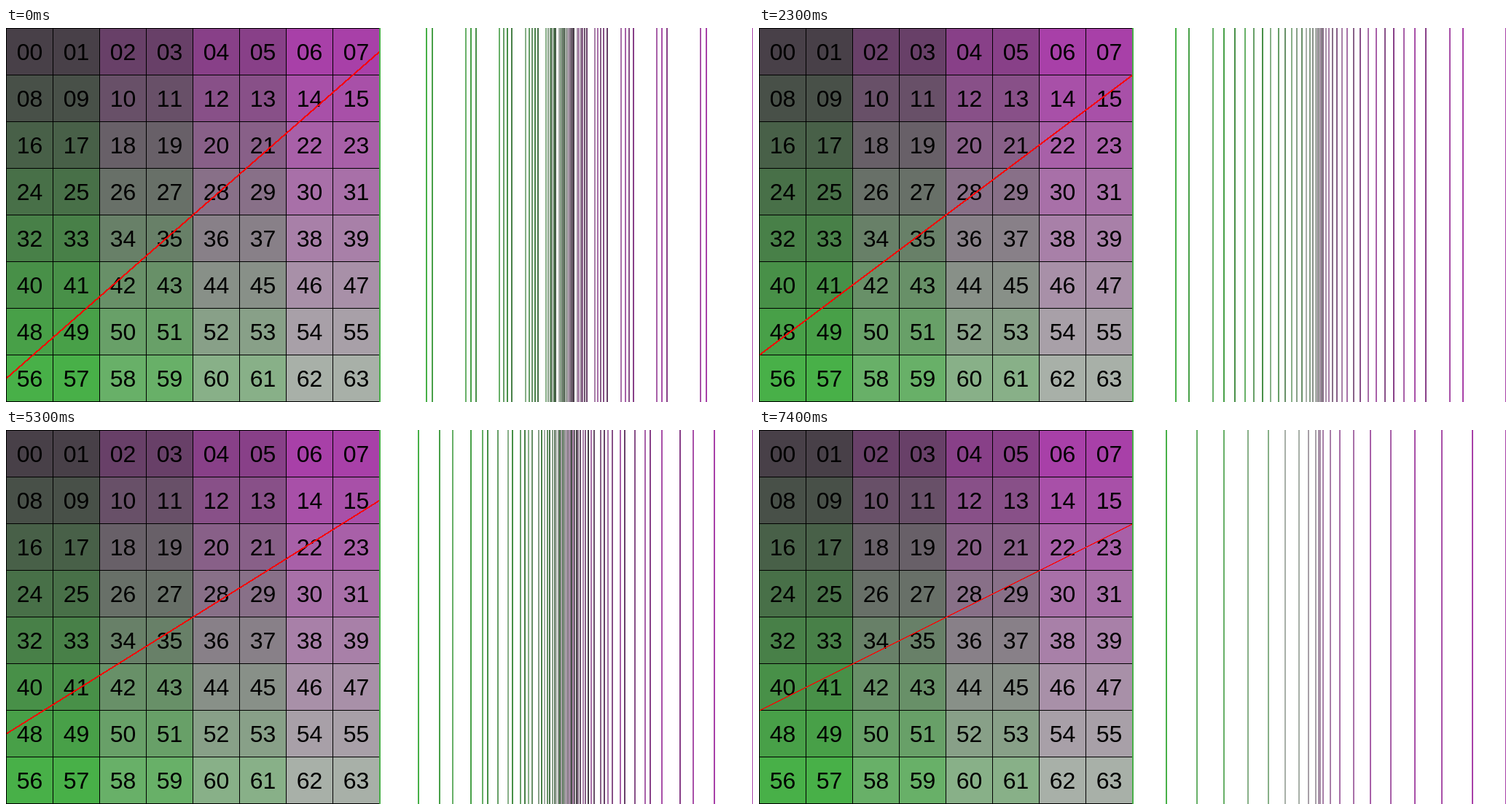
Write an HTML page that moves like this. It is 1025 by 513 pixels and loops after 8000 ms.

```html
<!DOCTYPE html>
<html lang="en">
<head>
<meta charset="utf-8">
<title>Grid projection</title>
<style>
  html, body { margin: 0; width: 100%; height: 100%; overflow: hidden; background: #fff; }
  svg { display: block; width: 1025px; height: 513px; }
  text {
    font: 32px "Liberation Sans", Arial, sans-serif;
    font-kerning: none;
    text-anchor: middle;
  }
</style>
</head>
<body>
<svg viewBox="0 0 1025 513">
  <g id="cells" shape-rendering="crispEdges"></g>
  <g id="labels"></g>
  <path id="ray" fill="#f00" shape-rendering="crispEdges"/>
  <g id="bars" shape-rendering="crispEdges"></g>
</svg>
<script>
const N = 8, CELL = 64, SIZE = N * CELL, MID = SIZE / 2;
const LOOP = 8000;
// start time in ms, rise of the ray per eight columns
const STEPS = [[0, 7], [500, 6], [3500, 5], [6500, 4]];

const $ = id => document.getElementById(id);

function add(parent, tag, attrs) {
  const el = document.createElementNS("http://www.w3.org/2000/svg", tag);
  for (const key in attrs) el.setAttribute(key, attrs[key]);
  return parent.appendChild(el);
}

const cells = Array.from({ length: N * N }, (_, n) => {
  const col = n % N, row = Math.floor(n / N);
  const rb = 72 + 32 * Math.floor(col / 2), g = 64 + 16 * row;
  return { n, col, row, fill: `rgb(${rb},${g},${rb})` };
});

function buildGrid() {
  const box = $("cells");
  add(box, "rect", { width: SIZE + 1, height: SIZE + 1, fill: "#000" });
  for (const { n, col, row, fill } of cells) {
    const x = col * CELL, y = row * CELL;
    add(box, "rect", { x: x + 1, y: y + 1, width: CELL - 1, height: CELL - 1, fill });
    add($("labels"), "text", { x: x + 32.5, y: y + 44 }).textContent =
      String(n).padStart(2, "0");
  }
}

// Stepped diagonal through the grid centre, one span per pixel row
function rayPath(rise) {
  const slope = rise / N;
  const shift = rise / Math.hypot(rise, N) > 0.5 ? 1 : 0;
  const low = MID + MID * slope;
  let d = "";
  for (let y = MID - MID * slope; y <= low + 1; y++) {
    const a = Math.max(1, Math.round((low - y) / slope - shift));
    const b = Math.min(SIZE, Math.ceil((low + 1 - y) / slope - 0.5));
    if (b >= a) d += `M${a} ${y}H${b + 1}v1H${a}z`;
  }
  return d;
}

// Signed square of the projected offset, scaled to the right half
function barX({ col, row }, rise) {
  const half = (N - 1) / 2;
  const s = (rise * (col - half) - N * (row - half)) / (half * (rise + N));
  return Math.round(SIZE + MID + MID * s * Math.abs(s));
}

buildGrid();
const bars = cells.map(c =>
  add($("bars"), "rect", { y: 0, width: 2, height: SIZE + 1, fill: c.fill }));

let shown;
function show(rise) {
  if (rise === shown) return;
  shown = rise;
  $("ray").setAttribute("d", rayPath(rise));
  bars.forEach((bar, n) => bar.setAttribute("x", barX(cells[n], rise)));
}

const start = performance.now();
function tick(now) {
  const t = Math.max(0, now - start) % LOOP;
  show(STEPS.filter(([at]) => at <= t).pop()[1]);
  requestAnimationFrame(tick);
}
show(STEPS[0][1]);
requestAnimationFrame(tick);
</script>
</body>
</html>
```
